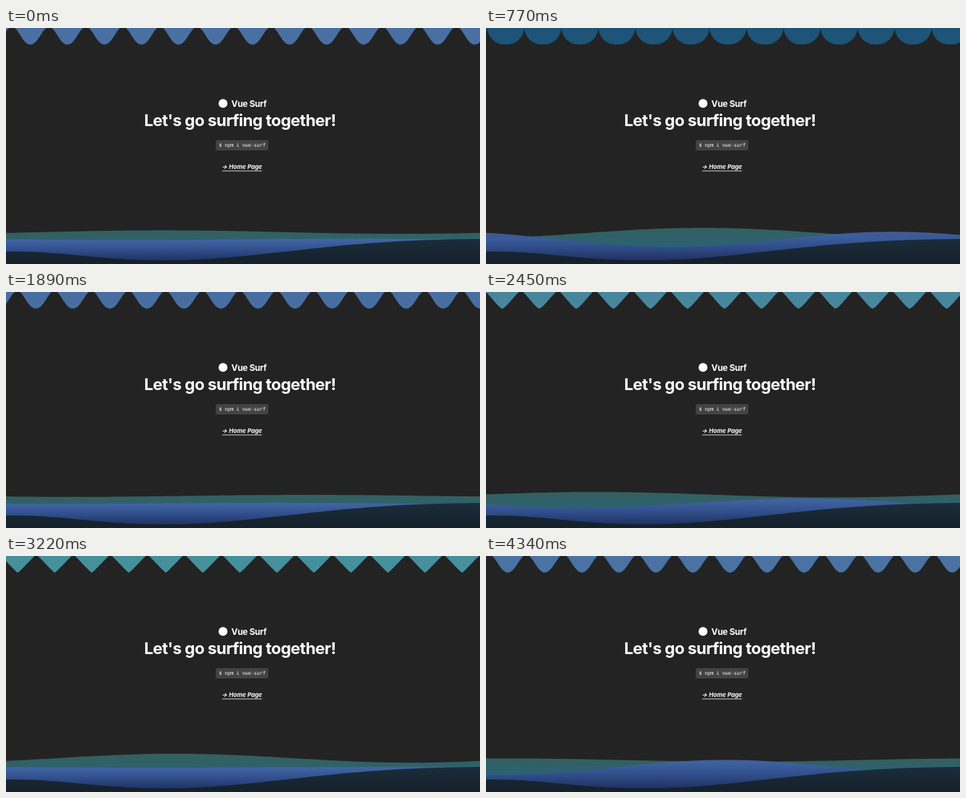
Animation, 640 px wide and 320 px high, one loop 4410 ms. Source, as an HTML page with a canvas:

```html
<!DOCTYPE html>
<html lang="en">
<head>
<meta charset="utf-8">
<title>Vue Surf</title>
<style>
  html, body { margin: 0; width: 100%; height: 100%; overflow: hidden; background: #232323; }
  canvas, svg { position: absolute; left: 0; top: 0; width: 640px; height: 320px; }
  text { fill: #fff; font-family: Inter, Roboto, sans-serif; font-weight: 700; }
  .name { font-size: 11.6px; letter-spacing: -0.025em; }
  .title { font-size: 22px; letter-spacing: -0.026em; }
  .code { font: 400 6.55px "DejaVu Sans Mono", monospace; fill: #fff; }
  .link { font-size: 8px; font-style: italic; }
</style>
</head>
<body>
<canvas id="sea"></canvas>
<svg viewBox="0 0 640 320">
  <circle cx="293" cy="102.3" r="6" fill="#fff"/>
  <text class="name" x="304.3" y="106.9">Vue Surf</text>
  <text class="title" x="186.4" y="133">Let's go surfing together!</text>
  <rect x="283.3" y="152" width="70.7" height="14" rx="2" fill="#434343"/>
  <text class="code" x="287.4" y="161">$ npm i vue-surf</text>
  <text class="link" x="318.7" y="190.8" text-anchor="middle">→ Home Page</text>
  <rect x="292" y="193.4" width="53.6" height="0.9" fill="#ddd"/>
</svg>
<script>
const W = 640, H = 320, LOOP = 4410, STEP = 70, TAU = Math.PI * 2;
const canvas = document.getElementById('sea');
const ctx = canvas.getContext('2d');
const dpr = window.devicePixelRatio || 1;
canvas.width = W * dpr;
canvas.height = H * dpr;
ctx.scale(dpr, dpr);

// Bezier handles: crest x, crest y, tip
const SINE = { color: [74, 111, 163], curve: [9, 0, 11] };
const SCALLOP = { color: [28, 83, 118], curve: [0, 12, 17] };
const ZIGZAG = { color: [69, 145, 155], curve: [2, 0, 2] };

const mix = (a, b, k) => a.map((v, i) => v + (b[i] - v) * k);

function ramp(y0, y1, ...colors) {
  const g = ctx.createLinearGradient(0, y0, 0, y1);
  colors.forEach((c, i) => g.addColorStop(i / (colors.length - 1), c));
  return g;
}

function swell(mid, amp, crest, length, fill) {
  ctx.beginPath();
  ctx.moveTo(0, H);
  for (let x = 0; x <= W; x += 4) ctx.lineTo(x, mid - amp * Math.cos((x - crest) / length * TAU));
  ctx.lineTo(W, H);
  ctx.fillStyle = fill;
  ctx.fill();
}

// The fringe morphs sine -> scallop -> sine -> zigzag while drifting right.
function fringe(t) {
  const u = t / LOOP;
  const morph = Math.sin(TAU * u + 0.42 * Math.sin(Math.PI * u));
  const goal = morph > 0 ? SCALLOP : ZIGZAG;
  const [cx, cy, h] = mix(SINE.curve, goal.curve, Math.abs(morph));
  const color = mix(SINE.color, goal.color, Math.abs(morph)).map(Math.round);
  const top = -1.5, tip = 22.5, half = 25;
  const first = (33 + 0.0568 * t) % 50 - 100;
  ctx.beginPath();
  ctx.moveTo(first - half, top);
  for (let x = first; x < W + 50; x += 50) {
    ctx.bezierCurveTo(x - half + cx, top + cy, x - h, tip, x, tip);
    ctx.bezierCurveTo(x + h, tip, x + half - cx, top + cy, x + half, top);
  }
  ctx.closePath();
  ctx.fillStyle = `rgb(${color})`;
  ctx.fill();
}

function tealWave(t) {
  const amp = 0.5 + 6.7 * Math.sin(0.28 + TAU * t / 4350);
  const mid = 276 + 0.3 * amp;
  swell(mid, amp, 213 + 0.104 * t, 640, ramp(mid - Math.abs(amp), 300, '#33605e', '#2a6278'));
}

function blueWave(t) {
  const amp = 2 + 8.5 * Math.sin(TAU * t / 3300 - 0.13);
  const mid = 286.6;
  const fill = ramp(mid - Math.abs(amp), 318, 'rgba(68,102,172,.88)', 'rgba(48,76,138,.95)', '#1c2b58');
  swell(mid, amp, 468 + 0.105 * t, 600, fill);
}

function seabed() {
  ctx.beginPath();
  ctx.moveTo(0, 303);
  ctx.bezierCurveTo(80, 302, 120, 315, 215, 315);
  ctx.bezierCurveTo(345, 315, 430, 287, W, 286);
  ctx.lineTo(W, H);
  ctx.lineTo(0, H);
  ctx.fillStyle = ramp(286, H, '#1b2c3a', '#14202a');
  ctx.fill();
}

function draw(t) {
  ctx.fillStyle = '#232323';
  ctx.fillRect(0, 0, W, H);
  fringe(t);
  tealWave(t);
  blueWave(t);
  seabed();
}

const start = performance.now();
function tick() {
  const t = (performance.now() - start) % LOOP;
  draw(Math.floor(t / STEP) * STEP);
  requestAnimationFrame(tick);
}
tick();
</script>
</body>
</html>
```
